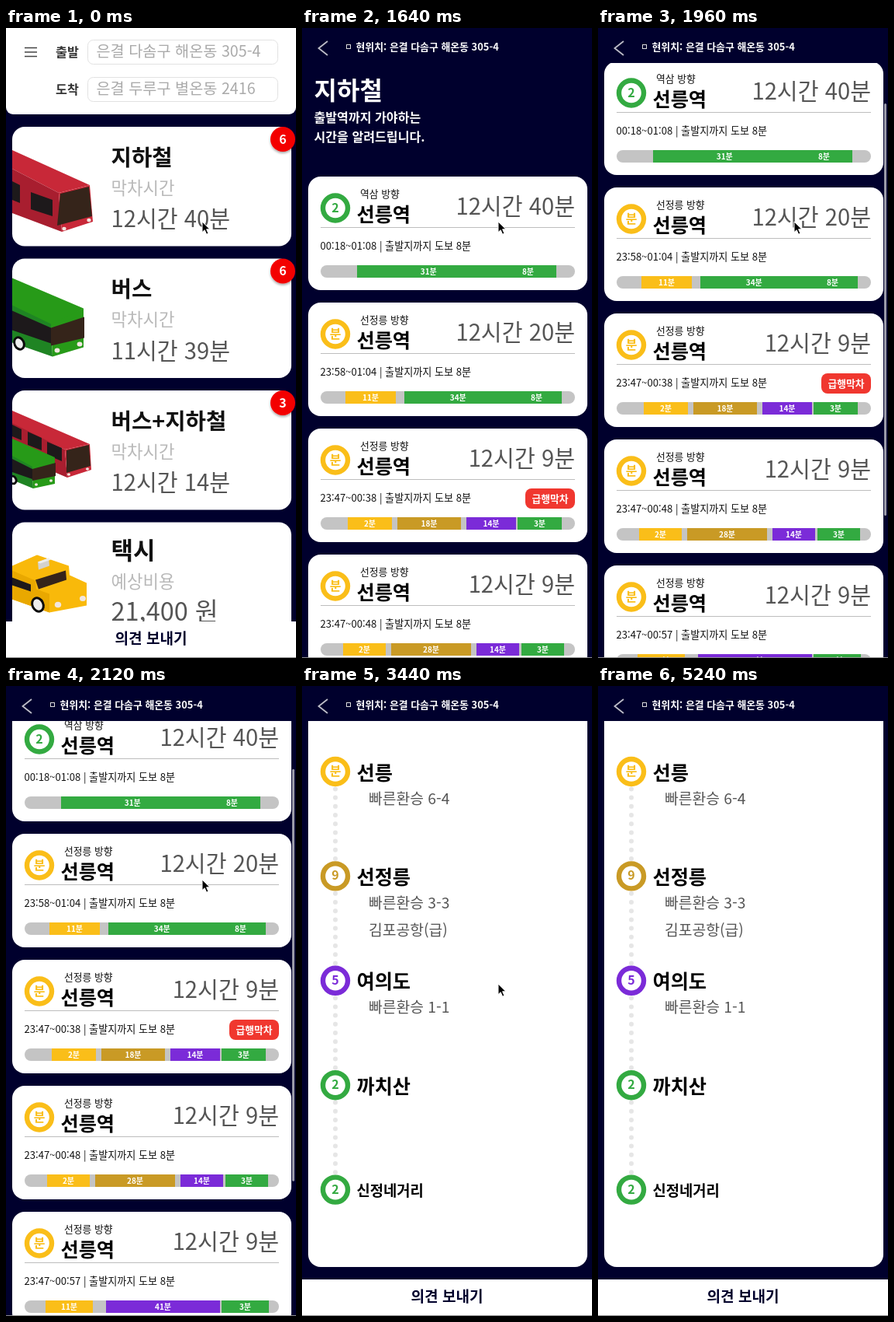
Animation, 374 px wide and 810 px high, one loop 5280 ms. Source, as an HTML page:

```html
<!DOCTYPE html>
<html lang="ko">
<head>
<meta charset="utf-8">
<style>
html, body { margin: 0; width: 100%; height: 100%; overflow: hidden; background: #00002d; }
svg { display: block; width: 374px; height: 810px; font-family: "Noto Sans CJK KR", "Noto Sans CJK", "Noto Sans KR", "Noto Sans", sans-serif; }
</style>
</head>
<body>
<svg id="stage" viewBox="0 0 374 810"></svg>
<script>
const LOOP = 5280;
const NAVY = '#00002d', GREY = '#555';
const YELLOW = '#fabe19', GOLD = '#c99a25', PURPLE = '#7b2bd8', GREEN = '#33aa41';
const FROM = '은결 다솜구 해온동 305-4', TO = '은결 두루구 별온동 2416';

const text = (x, y, size, str, fill = '#111', weight = 700, anchor = 'start') =>
  `<text x="${x}" y="${y}" font-size="${size}" fill="${fill}" font-weight="${weight}" text-anchor="${anchor}">${str}</text>`;
const rect = (x, y, w, h, fill, r = 0, extra = '') =>
  `<rect x="${x}" y="${y}" width="${w}" height="${h}" rx="${r}" fill="${fill}" ${extra}/>`;
const poly = (points, fill) => `<polygon points="${points}" fill="${fill}"/>`;
const oval = (x, y, rx, ry, fill, extra = '') =>
  `<ellipse cx="${x}" cy="${y}" rx="${rx}" ry="${ry}" fill="${fill}" ${extra}/>`;
const line = (d, stroke, width) => `<path d="${d}" fill="none" stroke="${stroke}" stroke-width="${width}"/>`;
const group = (inner, attrs = '') => `<g ${attrs}>${inner}</g>`;
const shift = (x, y, inner) => group(inner, `transform="translate(${x} ${y})"`);

const wheel = (x, y, rx, ry) =>
  oval(x, y, rx, ry, '#eee', 'stroke="#0c0c0c" stroke-width="3" transform="rotate(-25 ' + x + ' ' + y + ')"');
const lamps = (...spots) => spots.map(([x, y, r]) => oval(x, y, r, r * 0.9, '#f1e6e0')).join('');

// Vehicles, in coordinates relative to their card's top left corner
const redBus =
  poly('0,30 100,75 60,85 0,54', '#c82838') +
  poly('0,54 60,85 64,135 0,111', '#a81e2f') +
  poly('60,85 100,75 104,122 64,135', '#c82838') +
  poly('62,86 99,77 103,115 58,127', '#35241a') +
  poly('0,70 10,75 10,98 0,94', '#1d191b') +
  poly('24,84 52,94 52,115 24,106', '#1d191b') +
  lamps([67, 131, 2.6], [99, 120, 2.6]);

const greenBus =
  poly('0,25 92,64 50,89 0,66', '#279a18') +
  poly('0,60 50,84 52,126 0,108', '#1f8423') +
  poly('50,84 92,64 92,114 52,126', '#279a18') +
  poly('0,67 50,89 50,109 0,92', '#1d191b') +
  poly('50,89 93,75 93,102 50,112', '#35241a') +
  wheel(9, 109, 6, 8) + lamps([58, 118, 3.4], [87, 110, 3.4]);

const bothBuses =
  poly('0,26 100,69 68,76 0,44', '#c82838') +
  poly('0,42 68,76 71,112 0,82', '#a81e2f') +
  poly('68,76 100,69 102,102 71,112', '#c82838') +
  poly('70,77 99,70 101,97 70,106', '#35241a') +
  poly('0,44 12,50 12,64 0,59', '#1d191b') +
  poly('20,53 38,61 38,77 20,70', '#1d191b') +
  poly('45,66 64,74 64,91 45,83', '#1d191b') +
  lamps([73, 108, 2], [97, 101, 2]) +
  poly('0,62 55,86 26,102 0,88', '#279a18') +
  poly('0,84 26,98 27,126 0,115', '#1f8423') +
  poly('26,98 55,86 55,120 27,126', '#279a18') +
  poly('0,88 26,101 26,114 0,105', '#1d191b') +
  poly('26,101 56,93 56,110 26,116', '#35241a') +
  wheel(1, 115, 4, 5) + lamps([31, 121, 2], [50, 116, 2]);

const taxi =
  poly('0,56 32,42 73,56 74,68 96,78 96,107 48,116 0,99', '#f9b90a') +
  poly('0,62 30,75 31,86 48,92 48,116 0,99', '#e9a800') +
  poly('0,71 24,80 24,89 0,81', '#1d191b') +
  poly('30,74 69,62 70,74 34,86', '#35241a') +
  poly('33,51 47,46 48,56 34,61', '#d4d2cd') +
  poly('33,51 47,46 50,48 36,53', '#f0efec') +
  wheel(33, 106, 7, 9) + lamps([59, 106, 4.2], [91, 98, 4]);

const badge = (y, n) => oval(357, y, 16, 16, '#f30000', 'filter="url(#soft)"') +
  text(357, y + 5.5, 16, n, '#fff', 700, 'middle');

const footer = rect(0, 763, 374, 47, '#fff') + text(187, 791.5, 19.1, '의견 보내기', NAVY, 700, 'middle');

function homeCard(i, art, name, label, value, count) {
  const y = 127 + i * 169.5, last = i === 3, up = last ? 2.5 : 0;
  return shift(8, y,
    rect(0, 0, 360, 153.5, '#fff', 16) +
    group(art, 'clip-path="url(#homeClip)"') +
    text(127.5, 49.5 - up, last ? 31 : 28.7, name) +
    text(127.5, 86.5 - up, 22.3, label, '#b9b9b9', 500) +
    text(127.5, last ? 126.5 : 129, last ? 32.5 : 29.2, value, GREY, 500)) +
    (count ? badge(y + 16, count) : '');
}

function homePage() {
  const field = (y, label, value) =>
    text(64, y + 21.5, 16.2, label, '#333') +
    rect(105.5, y + 0.5, 245, 31, '#fff', 7, 'stroke="#e2e2e2"') +
    text(116.5, y + 21.7, 19.7, value, '#aaa', 400);
  return homeCard(0, redBus, '지하철', '막차시간', '12시간 40분', 6) +
    homeCard(1, greenBus, '버스', '막차시간', '11시간 39분', 6) +
    homeCard(2, bothBuses, '버스+지하철', '막차시간', '12시간 14분', 3) +
    homeCard(3, taxi, '택시', '예상비용', '21,400 원', 0) +
    rect(0, -12, 374, 123, '#fff', 9) +
    line('M24 25.5H40M24 31H40M24 36.5H40', '#444', 1.3) +
    field(15, '출발', FROM) + field(63, '도착', TO) + footer;
}

const ring = (y, color, label) => oval(43, y, 16, 16, '#fff', `stroke="${color}" stroke-width="6.4"`) +
  text(43, y + 5, 16, label, color, 700, 'middle');

const topBar = rect(0, 0, 374, 45, NAVY) +
  line('M33 17L21.5 26L33 35', '#bdbdc8', 1.8) +
  rect(57.5, 21.5, 5, 5, 'none', 0, 'stroke="#ddd" stroke-width="1"') +
  text(69.5, 29.3, 12.9, '현위치: ' + FROM, '#fff');

// Each segment: left, right, colour, minutes
const routes = [
  { color: GREEN, mark: '2', way: '역삼', left: '12시간 40분', span: '00:18~01:08',
    parts: [[71, 255.5, GREEN, 31], [255, 328, GREEN, 8]] },
  { color: YELLOW, mark: '분', way: '선정릉', left: '12시간 20분', span: '23:58~01:04',
    parts: [[56, 121, YELLOW, 11], [132, 270.5, GREEN, 34], [270, 335, GREEN, 8]] },
  { color: YELLOW, mark: '분', way: '선정릉', left: '12시간 9분', span: '23:47~00:38', express: true,
    parts: [[59, 116, YELLOW, 2], [123, 205, GOLD, 18], [212, 276, PURPLE, 14], [278, 335, GREEN, 3]] },
  { color: YELLOW, mark: '분', way: '선정릉', left: '12시간 9분', span: '23:47~00:48',
    parts: [[53, 108, YELLOW, 2], [115, 218, GOLD, 28], [225, 280, PURPLE, 14], [283, 338, GREEN, 3]] },
  { color: YELLOW, mark: '분', way: '선정릉', left: '12시간 9분', span: '23:47~00:57',
    parts: [[51, 112, YELLOW, 11], [129, 276, PURPLE, 41], [278, 339, GREEN, 3]] }
];

const routeCard = (r, i) => shift(0, 191 + i * 162,
  rect(8, 0, 360, 146, '#fff', 16) + ring(40.5, r.color, r.mark) +
  text(75, 27.3, 12.8, r.way + ' 방향', '#111', 500) +
  text(70.5, 58, 25.2, '선릉역', '#000') +
  text(352, 49, 29.2, r.left, GREY, 500, 'end') +
  rect(24, 65, 328, 1, '#bdbdbd') +
  text(23.5, 93.5, 13.1, r.span + ' | 출발지까지 도보 8분', '#111', 500) +
  (r.express ? rect(288, 77, 64, 26, '#f0372f', 8) + text(320, 94.5, 12.8, '급행막차', '#fff', 700, 'middle') : '') +
  rect(24, 114, 328, 16, '#c4c4c4', 8) +
  r.parts.map(([a, b, color, n]) => rect(a, 114, b - a, 16, color) +
    text((a + b) / 2, 125.7, 10, n + '분', '#fff', 700, 'middle')).join(''));

const listBody =
  text(15.5, 92, 32, '지하철', '#fff') +
  text(15.5, 120.5, 16.1, '출발역까지 가야하는', '#fff') +
  text(15.5, 145.5, 16.1, '시간을 알려드립니다.', '#fff') +
  routes.map(routeCard).join('');

const stops = [
  [YELLOW, '분', '선릉', '빠른환승 6-4'],
  [GOLD, '9', '선정릉', '빠른환승 3-3', '김포공항(급)'],
  [PURPLE, '5', '여의도', '빠른환승 1-1'],
  [GREEN, '2', '까치산'],
  [GREEN, '2', '신정네거리']
];

function detailPage() {
  const gap = 134.4;
  let out = rect(8, 20, 360, 727, '#fff', 16);
  stops.forEach(([color, mark, name, ...notes], i) => {
    const y = 110 + i * gap, last = i === stops.length - 1;
    for (let k = 2; k < 11 && !last; k++) out += oval(43, y + k * gap / 12, 3, 3, '#e6e6e6');
    out += ring(y, color, mark) + text(70.5, y + (last ? 8 : 10.5), last ? 18.8 : 25.2, name, '#000');
    notes.forEach((note, n) => { out += text(86, y + 41.5 + n * 35, 19.3, note, GREY, 500); });
  });
  return out + topBar + footer;
}

const stage = document.getElementById('stage');
stage.innerHTML = `<defs>
  <clipPath id="homeClip"><rect width="360" height="153.5" rx="16"/></clipPath>
  <filter id="soft" x="-30%" y="-30%" width="160%" height="170%">
    <feDropShadow dx="0" dy="2" stdDeviation="1.5" flood-color="#000" flood-opacity=".35"/></filter>
  </defs>` +
  rect(0, 0, 374, 810, NAVY) +
  group(homePage(), 'id="home"') +
  group(group(listBody, 'id="body"') + topBar + rect(369, 0, 3, 530, '#9a9aa8', 1.5, 'id="thumb"'), 'id="list"') +
  group(detailPage(), 'id="detail"') +
  rect(0, 809, 374, 1, '#8c8c8c') +
  group('<path d="M0 0V13.6L3.2 10.7L5.6 16.2L8 15.2L5.6 9.8H10Z" fill="#000" stroke="#fff" stroke-width="1"/>', 'id="cursor"');

const el = id => document.getElementById(id);
const [home, list, detail, body, thumb, cursor] = ['home', 'list', 'detail', 'body', 'thumb', 'cursor'].map(el);
const show = (node, on) => node.setAttribute('display', on ? 'inline' : 'none');
const move = (node, x, y) => node.setAttribute('transform', `translate(${x} ${y})`);
const clamp = v => Math.max(0, Math.min(1, v));
const ease = (t, a, b) => { const u = clamp((t - a) / (b - a)); return u * u * (3 - 2 * u); };

function draw(t) {
  show(home, t < 880);
  show(list, t >= 880 && t < 2900);
  show(detail, t >= 2900);

  // Momentum scroll of the list
  const u = Math.max(0, t - 1650) / 83;
  const scroll = Math.round(167 * (1 - Math.exp(-u) * (1 + u)));
  move(body, 0, -scroll);
  thumb.setAttribute('y', scroll * 0.655);
  thumb.setAttribute('opacity', t < 1660 ? 0 : 1 - ease(t, 2480, 2680));

  // Overscroll bounce at the page end
  move(detail, 0, Math.round(-6 * ease(t, 4620, 4820) * (1 - ease(t, 4820, 5180))));

  move(cursor, 253, 249 + 134 * ease(t, 2280, 2620));
  show(cursor, t < 5000);
}

const start = performance.now();
function tick() {
  draw((performance.now() - start) % LOOP);
  requestAnimationFrame(tick);
}
tick();
</script>
</body>
</html>
```
